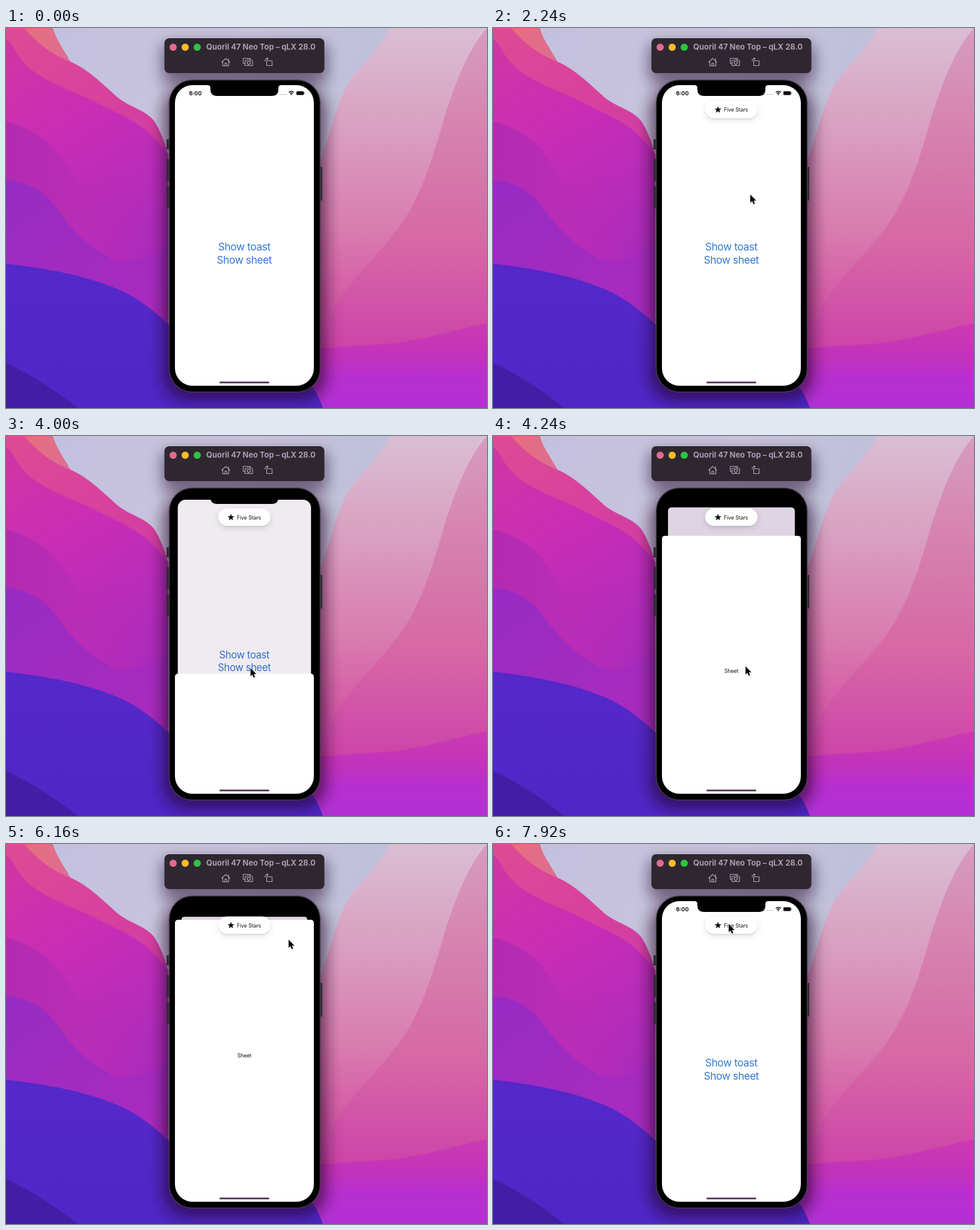
Write an HTML page that moves like this. It is 800 by 632 pixels and loops after 8 s.

```html
<!DOCTYPE html>
<html lang="en">
<head>
<meta charset="utf-8">
<title>Toast over sheet</title>
<style>
  html, body { margin: 0; width: 100%; height: 100%; overflow: hidden; background: #c5bfdd; }
  svg { display: block; width: 800px; height: 632px; font-family: Inter, "Open Sans", sans-serif; }
  .link { font-size: 17.4px; letter-spacing: -.45px; fill: #3478d8; text-anchor: middle; }
  .small { font-size: 8.8px; letter-spacing: -.1px; fill: #17101c; }
  .title { font-size: 12.9px; font-weight: 700; fill: #ad9bb3; }
  .clock { font-size: 9px; font-weight: 700; fill: #17101c; }
  .icon { fill: none; stroke: #b8a5bf; stroke-width: 1.1; stroke-linejoin: round; stroke-linecap: round; }
</style>
</head>
<body>
<svg viewBox="0 0 800 632">
  <defs>
    <linearGradient id="sky" x1="0" x2="1" y1="0" y2=".25">
      <stop offset="0" stop-color="#c2bfe0"/><stop offset=".5" stop-color="#cac4dc"/>
      <stop offset=".72" stop-color="#bfc0da"/><stop offset="1" stop-color="#d8cadc"/>
    </linearGradient>
    <linearGradient id="coral" x1="0" x2="1" y1="0" y2="1">
      <stop offset="0" stop-color="#e66e7c"/><stop offset="1" stop-color="#db6c98"/>
    </linearGradient>
    <linearGradient id="rose" x1="0" x2=".8" y1="0" y2="1">
      <stop offset="0" stop-color="#de4a94"/><stop offset="1" stop-color="#d03ba6"/>
    </linearGradient>
    <linearGradient id="magenta" x1="0" x2=".35" y1="0" y2="1">
      <stop offset="0" stop-color="#d136a3"/><stop offset=".4" stop-color="#c82db6"/>
      <stop offset="1" stop-color="#a62bbd"/>
    </linearGradient>
    <linearGradient id="violet" x1="0" x2="1" y1="0" y2="0">
      <stop offset="0" stop-color="#b32bb2"/><stop offset=".45" stop-color="#b92cb6"/>
      <stop offset="1" stop-color="#b92cb6" stop-opacity="0"/>
    </linearGradient>
    <linearGradient id="purple" x1="0" x2=".7" y1="0" y2="1">
      <stop offset="0" stop-color="#972bc4"/><stop offset="1" stop-color="#a92bbd"/>
    </linearGradient>
    <linearGradient id="blue" x1="0" x2="0" y1="0" y2="1">
      <stop offset="0" stop-color="#5528ca"/><stop offset="1" stop-color="#4f26c6"/>
    </linearGradient>
    <linearGradient id="pink" x1="0" x2="0" y1="0" y2="1">
      <stop offset="0" stop-color="#d9bed4"/><stop offset=".25" stop-color="#d9a3c2"/>
      <stop offset=".55" stop-color="#d97db0"/><stop offset=".74" stop-color="#d55da6"/>
      <stop offset=".9" stop-color="#cd42aa"/><stop offset="1" stop-color="#c834b4"/>
    </linearGradient>
    <linearGradient id="deep" x1="0" x2="0" y1="0" y2="1">
      <stop offset="0" stop-color="#d69dbd"/><stop offset=".35" stop-color="#d67fae"/>
      <stop offset=".68" stop-color="#d666a5"/><stop offset="1" stop-color="#cc42aa"/>
    </linearGradient>
    <linearGradient id="floor" x1="0" x2="0" y1="0" y2="1">
      <stop offset="0" stop-color="#ca3bb0"/><stop offset=".4" stop-color="#c232bc"/>
      <stop offset=".65" stop-color="#b82fd0"/><stop offset="1" stop-color="#b130d6"/>
    </linearGradient>
    <filter id="soft" x="-40%" y="-60%" width="180%" height="220%"><feGaussianBlur stdDeviation="12"/></filter>
    <filter id="mid" x="-60%" y="-120%" width="220%" height="340%"><feGaussianBlur stdDeviation="6"/></filter>
    <filter id="fine" x="-20%" y="-40%" width="140%" height="180%"><feGaussianBlur stdDeviation="1.2"/></filter>
    <clipPath id="screen"><rect x="281" y="95" width="231" height="500" rx="29"/></clipPath>
  </defs>

  <!-- wallpaper -->
  <rect width="800" height="632" fill="url(#sky)"/>
  <path d="M20 0H78C84 22 98 38 107 56L120 80L40 40Z" fill="url(#coral)"/>
  <path d="M0 0H30C52 26 80 46 107 56C132 66 158 90 185 115C206 132 231 136 245 153C257 169 264 191 270 211V300H0Z" fill="url(#rose)"/>
  <path d="M0 17C14 28 18 48 34 62C66 92 112 104 152 125C190 145 230 155 270 211V520H0Z" fill="url(#magenta)"/>
  <path d="M0 155C34 164 66 182 88 212C104 234 112 250 128 264C160 250 200 236 240 262V420H0Z" fill="url(#violet)"/>
  <path d="M0 253C36 255 62 270 84 300C112 338 140 368 186 388C220 398 246 372 270 366V520H0Z" fill="url(#purple)"/>
  <path d="M640 0C622 36 590 60 570 91C548 128 538 180 525 215L500 260V600H800V0Z" fill="url(#pink)"/>
  <path d="M800 0C768 36 746 94 728 152C708 222 690 282 652 334C622 374 578 412 548 462L520 540H800Z" fill="url(#deep)"/>
  <path d="M500 536C560 528 606 528 650 524C704 516 752 500 800 492V632H500Z" fill="url(#floor)"/>
  <path d="M0 392C70 400 128 411 180 432C222 449 246 471 270 493L420 550L505 592C516 604 522 618 527 632H0Z" fill="url(#blue)"/>
  <path d="M0 557C42 576 84 604 119 632H0Z" fill="#421ea5"/>

  <!-- shadows of the windows -->
  <g fill="#1c0a24" filter="url(#soft)">
    <rect x="260" y="26" width="274" height="66" rx="10" opacity=".5"/>
    <rect x="261" y="96" width="272" height="524" rx="40" opacity=".58"/>
  </g>

  <!-- window bar -->
  <rect x="263.5" y="17" width="266" height="58" rx="8" fill="#2f2730"/>
  <circle cx="278" cy="32" r="6" fill="#e06c90"/>
  <circle cx="298" cy="32" r="6" fill="#f7bb2e"/>
  <circle cx="318" cy="32" r="6" fill="#2cc543"/>
  <text class="title" x="333" y="36">Quoril 47 Neo Top – qLX 28.0</text>
  <g class="icon">
    <path d="M358.5 57L365.5 50.5L372.5 57M360.5 56V63H370.5V56M364 63V58.5H367V63M370 51V54"/>
    <path d="M397 59H394.5V50.5H406.5V52.5M397.5 54H400.5L401.5 52.7H405.5L406.5 54H410V62.5H397.5Z"/>
    <circle cx="403.7" cy="58" r="2.6"/>
    <path d="M433.5 54.5H442.5V62.5H433.5ZM431 55C431 52 432.5 51 435.5 51M434 49.3L435.8 51L434 52.7"/>
  </g>

  <!-- handset -->
  <g fill="#302a34">
    <rect x="267" y="185" width="5" height="17" rx="1"/>
    <rect x="267" y="218" width="5" height="37" rx="1"/>
    <rect x="267" y="263" width="5" height="37" rx="1"/>
    <rect x="521" y="231" width="5" height="56" rx="1"/>
  </g>
  <rect x="271.5" y="86.500" width="251" height="519" rx="38.5" fill="#000" stroke="#463d4a" stroke-width="1.5"/>

  <g clip-path="url(#screen)">
    <g id="card">
      <rect id="page" width="231" height="500" fill="#fff"/>
      <text class="link" x="115.300" y="275">Show toast</text>
      <text class="link" x="115.300" y="297">Show sheet</text>
      <rect id="dim" width="231" height="500" fill="#3c0050"/>
    </g>
    <g id="status">
      <text class="clock" x="304.5" y="111.5">6:00</text>
      <path d="M456.5 110.5H467" stroke="#aaa2ae" stroke-width="1.4" stroke-dasharray="1.5 1.3"/>
      <path d="M470.3 107Q474.5 103.4 478.7 107M472 109Q474.5 107 477 109" fill="none" stroke="#100a14" stroke-width="1.4"/>
      <circle cx="474.5" cy="110.6" r="1.1" fill="#100a14"/>
      <rect x="483" y="105.3" width="12.5" height="6.3" rx="1.7" fill="#100a14"/>
      <rect x="496" y="107.2" width="1" height="2.5" fill="#888"/>
    </g>
    <g id="sheet">
      <rect x="281" y="0" width="231" height="520" rx="5" fill="#fff"/>
      <text class="small" x="396.5" y="228.5" text-anchor="middle">Sheet</text>
    </g>
    <rect x="355" y="588" width="83" height="3" rx="1.5" fill="#5d4163"/>
    <g id="toast">
      <rect x="353" y="124" width="87" height="29" rx="14.5" fill="#001008" opacity=".11" filter="url(#mid)"/>
      <rect x="353.5" y="122" width="86" height="29" rx="14.5" fill="#2b1035" opacity=".12" filter="url(#fine)"/>
      <rect x="353" y="120.5" width="87" height="29" rx="14.5" fill="#fff"/>
      <path id="star"/>
      <text class="small" x="384" y="138.5">Five Stars</text>
    </g>
    <path d="M335 90V95Q340 95 340 100V102Q340 113 351 113H442Q453 113 453 102V100Q453 95 458 95V90Z"/>
  </g>

  <g id="cursor">
    <path d="M0 0V13.5L3.1 10.7L5.2 15.7L7.5 14.7L5.4 9.9H9.7Z" transform="translate(.6 1.5)" opacity=".3" filter="url(#fine)"/>
    <path d="M0 0V13.5L3.1 10.7L5.2 15.7L7.5 14.7L5.4 9.9H9.7Z" stroke="#fff" stroke-width="1.3" paint-order="stroke"/>
  </g>
</svg>
<script>
const LOOP = 8000, STEP = 80;
const TOAST_IN = 1760, SHEET_IN = 3868, DRAG = 6320, RELEASE = 6800;
const TRAVEL = 469;
const $ = id => document.getElementById(id);
const put = (id, attrs) => {
  for (const k in attrs) $(id).setAttribute(k, attrs[k]);
};
const mix = (a, b, p) => a + (b - a) * p;

// time, x, y of the pointer tip
const pointer = [
  [480, 812, 250], [1120, 393, 342], [1360, 398, 364], [1760, 398, 364],
  [2240, 428, 277], [2640, 432, 282], [3440, 403, 405], [3680, 402, 387],
  [3880, 402, 387], [4240, 420, 383], [4800, 446, 290], [5600, 474, 165],
  [6160, 470, 159], [DRAG, 469, 156], [RELEASE, 457, 400],
  [7000, 455, 404], [7840, 392, 133], [LOOP, 392, 133]
];

function tip(t) {
  if (t < pointer[0][0]) return [-50, -50];
  const i = pointer.findIndex(k => k[0] > t);
  const a = pointer[i - 1], b = pointer[i];
  const p = (t - a[0]) / (b[0] - a[0]), e = p * p * (3 - 2 * p);
  return [mix(a[1], b[1], e), mix(a[2], b[2], e)];
}

function settle(ms, w = 11) {
  const x = w * Math.max(0, ms) / 1000;
  return 1 - (1 + x) * Math.exp(-x);
}

function bounce(ms) {
  const s = Math.max(0, ms) / 1000, w = 11.4, z = .82;
  const d = w * Math.sqrt(1 - z * z);
  return 1 - Math.exp(-z * w * s) * (Math.cos(d * s) + z * w / d * Math.sin(d * s));
}

function sheetAmount(t) {
  if (t < DRAG) return settle(t - SHEET_IN);
  const pulled = y => 1 - Math.max(0, y - tip(DRAG)[1]) / TRAVEL;
  if (t < RELEASE) return pulled(tip(t)[1]);
  const p = pulled(tip(RELEASE)[1]) * (1 - settle(t - RELEASE, 14));
  return p < .002 ? 0 : p;
}

function draw(t) {
  const p = sheetAmount(t);
  put("card", { transform: `translate(${281 + 11 * p} ${95 + 26 * p}) scale(${1 - 22 / 231 * p})` });
  put("page", { rx: p ? mix(20, 5, p) : 0 });
  put("dim", { rx: mix(20, 5, p), opacity: .18 * p });
  put("status", { opacity: Math.max(0, 1 - p * 3) });
  put("sheet", { transform: `translate(0 ${595 - TRAVEL * p})`, visibility: p ? "visible" : "hidden" });
  put("toast", {
    transform: `translate(0 ${mix(-62, 0, bounce(t - TOAST_IN))})`,
    visibility: t < TOAST_IN ? "hidden" : "visible"
  });
  put("cursor", { transform: `translate(${tip(t)})` });
}

const star = Array.from({ length: 10 }, (_, i) => {
  const r = i % 2 ? 2.4 : 6, a = i * Math.PI / 5;
  return [374.2 + r * Math.sin(a), 135.4 - r * Math.cos(a)].map(v => v.toFixed(2));
});
put("star", { d: `M${star.join("L")}Z` });

const start = performance.now();
function tick() {
  const t = (performance.now() - start) % LOOP;
  draw(Math.floor(t / STEP) * STEP);
  requestAnimationFrame(tick);
}
tick();
</script>
</body>
</html>
```
